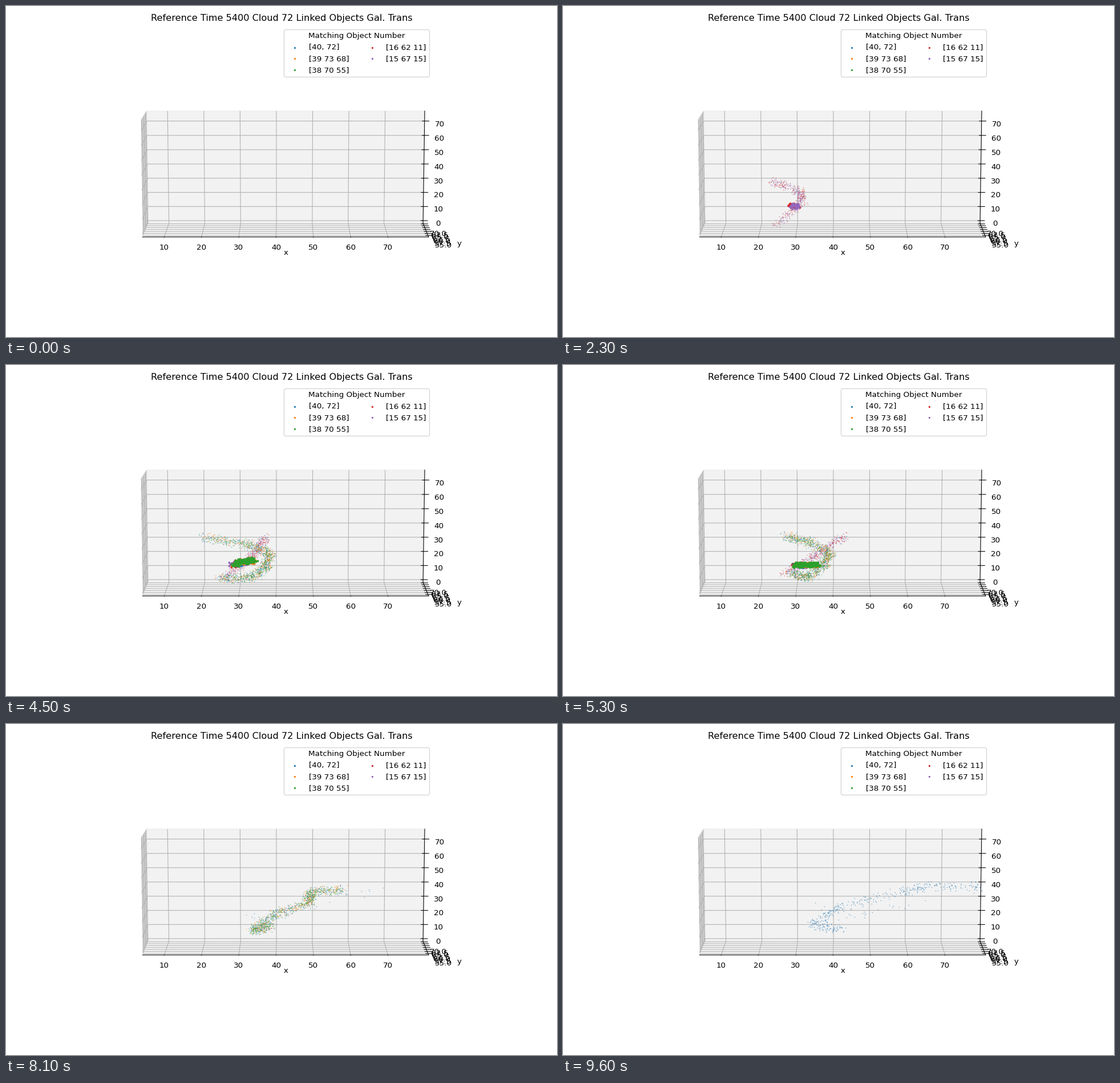
Animation of 966x580 px, one loop 9.7 s. Source, as a matplotlib script:

```python
import numpy as np
import matplotlib.pyplot as plt
from matplotlib.animation import FuncAnimation

W, H, DPI = 966, 580, 96
FRAMES, STEP = 97, 100
BLUE, ORANGE, GREEN, RED, PURPLE = COLORS = [f"C{i}" for i in range(5)]
NAMES = ["[40, 72]", "[39 73 68]", "[38 70 55]", "[16 62 11]", "[15 67 15]"]
LAST = {BLUE: 10, ORANGE: 9, GREEN: 8.7, RED: 7.4, PURPLE: 7.4}  # seconds
DEPTH = 62  # all particles lie in one plane of constant y

plt.rcParams["font.family"] = "DejaVu Sans"
plt.rcParams["font.size"] = 10.1
rng = np.random.default_rng(72)

fig = plt.figure(figsize=(W / DPI, H / DPI), dpi=DPI, facecolor="white")
SIDE = 531.3
ax = fig.add_axes([217.35 / W, 14.4 / H, SIDE / W, SIDE / H], projection="3d")


def set_scene():
    # a hair off -90 degrees, so that the left wall is surely the far one
    ax.view_init(elev=10, azim=-89.99)
    ax.set_box_aspect((17, 4, 7))
    ax.set(xlim=(4.2, 80.9), ylim=(53.2, 70.9), zlim=(-1.85, 77),
           xticks=range(10, 80, 10), yticks=np.arange(55, 71, 2.5),
           zticks=range(0, 80, 10), xlabel="x", ylabel="y")
    ax.set_title("Reference Time 5400 Cloud 72 Linked Objects Gal. Trans")
    for color, name in zip(COLORS, NAMES):
        ax.scatter([], [], [], s=2, color=color, label=name, depthshade=False)
    ax.legend(title="Matching Object Number", ncol=2, loc="upper right")


class Cloud:
    """Particles strewn along a curve, one set of dots per colour."""

    def __init__(self, n, shares, size, alpha, zorder, span=(0, 1)):
        self.u = rng.uniform(*span, n)
        self.rank = rng.random(n)
        self.jitter = np.clip(rng.normal(size=(2, n)), -1.9, 1.9)
        self.color = rng.choice(list(shares), n, p=list(shares.values()))
        self.dots = {c: ax.plot([], [], [], "o", color=c, ms=size, mew=0,
                                alpha=alpha, zorder=zorder)[0] for c in shares}

    def draw(self, t, curve, spread, share):
        x, z = curve(self.u)
        x = x + self.jitter[0] * spread / 2
        z = z + self.jitter[1] * spread
        for c, dots in self.dots.items():
            on = (self.color == c) & (self.rank < share) & (t <= LAST[c])
            dots.set_data_3d(x[on], np.full(on.sum(), DEPTH), z[on])

    def raise_to(self, zorder):
        for dots in self.dots.values():
            dots.set_zorder(zorder)


class Arm:
    """A bent line whose corners travel on parabolas through three poses."""

    def __init__(self, times, poses):
        poses = np.array(poses, float)
        self.shape = poses.shape[1:]
        self.coef = np.polyfit(times, poses.reshape(3, -1), 2)

    def at(self, t):
        corners = (t ** np.array([2, 1, 0]) @ self.coef).reshape(self.shape)
        stops = np.linspace(0, 1, len(corners))
        return lambda u: [np.interp(u, stops, c) for c in corners.T]


def bump(t, center, width):
    return np.exp(-((t - center) / width) ** 2)


def smooth(f):
    f = np.clip(f, 0, 1)
    return f * f * (3 - 2 * f)


def lift_at(t):
    """How far the dense core rears up: a little, then fully."""
    t = min(t, 6.9)
    return 0.4 * bump(t, 3.7, 0.7) + bump(t, 6.9, 0.7)


def core_curve(t):
    """A flat streak that bends into a quarter arch as it lifts."""
    lift = lift_at(t)
    foot = 28 + 7.3 * smooth((t - 4.9) / 2)
    reach = 3.2 + 1.25 * (t - 2.3) if t > 2.3 else 3.2

    def curve(u):
        arch = 1 - np.cos(u * np.pi / 2)
        return (foot + reach * (u + lift * (arch - u)),
                14.8 + 29 * lift * np.sin(u * np.pi / 2))
    return curve


set_scene()

inner_arm = Arm((0.1, 2.3, 6.9), [
    [(12.7, 31.7), (29.3, 27), (33.5, 18), (24.3, 1.1)],
    [(22.8, 32.1), (30.4, 26.2), (31.6, 17.2), (24.3, 1.5)],
    [(56.8, 37.6), (44, 26.2), (34.7, 17.2), (28.5, 15.6)]])
outer_arm = Arm((3.7, 5.3, 9.6), [
    [(13.8, 33.3), (32.4, 27.8), (38.2, 23.8), (37.2, 12.5), (33.5, 7), (20, 0.7)],
    [(26.7, 34.8), (33.3, 31), (39.1, 23), (37.5, 15), (33.2, 6.6), (28.2, 8.9)],
    [(79.6, 41), (65.8, 41), (58, 37), (41.7, 26.2), (33.8, 14.8), (42.2, 10.9)]])

inner_shares = {BLUE: 0.06, RED: 0.47, PURPLE: 0.47}
outer_shares = {BLUE: 0.32, ORANGE: 0.32, GREEN: 0.36}
dense_shares = {BLUE: 0.12, ORANGE: 0.28, GREEN: 0.6}

inner_dust = Cloud(400, inner_shares, 1.2, 0.55, 3)
outer_dust = Cloud(1150, outer_shares, 1.2, 0.55, 4)
inner_core = Cloud(330, inner_shares, 2.9, 1, 5, span=(0, 0.75))
outer_core = Cloud(720, dense_shares, 2.9, 1, 6, span=(0.12, 1))


def update(i):
    t = i * STEP / 1000
    lift = lift_at(t)
    inner_dust.draw(t, inner_arm.at(t), 1.5, float(i > 0))
    outer_dust.draw(t, outer_arm.at(t), 1.7,
                    (t > 2.5) * (1 - 0.6 * bump(t, 6.9, 0.7)))

    thick = 0.9 + min(1, 2 * lift)
    fade = np.clip(8 - t, 0, 1)
    inner_core.draw(t, core_curve(t), thick, (i > 0) * fade * (0.3 + 1.6 * lift))
    outer_core.draw(t, core_curve(t), thick, fade * (t - 3) / 3.5)
    inner_core.raise_to(7 if t < 4.5 else 5)
    return []


anim = FuncAnimation(fig, update, frames=FRAMES, interval=STEP,
                     repeat=True, repeat_delay=0)
plt.show()
```
